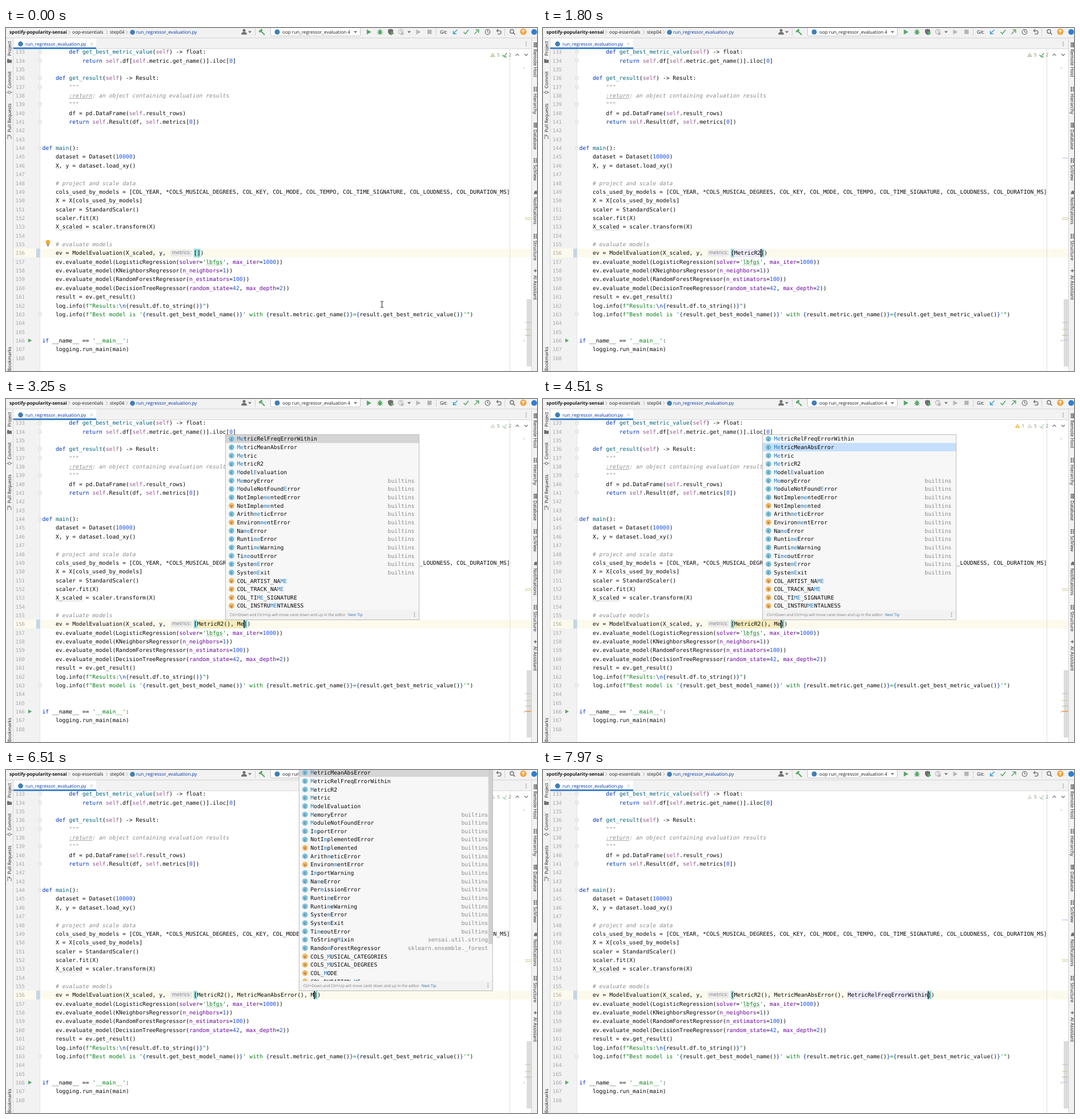
An HTML page that plays this animation: 930 by 602 pixels, repeating every 8 s.

```html
<!DOCTYPE html>
<html lang="en">
<head>
<meta charset="utf-8">
<title>Code completion</title>
<style>
html, body { margin: 0; width: 100%; height: 100%; overflow: hidden; background: #fff; }
svg { display: block; }
text { white-space: pre; text-rendering: geometricPrecision; }
.m { font: 9.725px "DejaVu Sans Mono", monospace; fill: #080808; }
.n { font-size: 9px; fill: #a8a8a8; }
.u { font: 8.1px "Open Sans", sans-serif; fill: #1a1a1a; }
.b { font-weight: 700; }
.k { fill: #0033b3; } .d { fill: #00627a; } .i { fill: #1750eb; }
.s { fill: #067d17; } .e { fill: #0037a6; } .p { fill: #94558d; }
.a { fill: #660099; } .c { fill: #8c8c8c; font-style: italic; }
.h { fill: #2480c4; }
</style>
</head>
<body>
<svg id="stage" width="930" height="602" viewBox="0 0 930 602"></svg>
<script>
const CW = 5.855, LINE = 15.357, ROW = 14.65, EDIT_X = 328.8, LOOP = 8000;
const lineY = n => 395 + (n - 156) * LINE;
const esc = s => s.replace(/&/g, '&amp;').replace(/</g, '&lt;').replace(/>/g, '&gt;');
const span = (cls, s) => `<tspan class="${cls}">${esc(s)}</tspan>`;
const rect = (x, y, w, h, fill, more = '') =>
  `<rect x="${x}" y="${y}" width="${w}" height="${h}" fill="${fill}" ${more}/>`;
const path = (d, stroke, w = 1, fill = 'none') =>
  `<path d="${d}" stroke="${stroke}" stroke-width="${w}" fill="${fill}"/>`;
const shape = (d, fill) => path(d, 'none', 0, fill);
const dot = (x, y, r, fill, more = '') => `<circle cx="${x}" cy="${y}" r="${r}" fill="${fill}" ${more}/>`;
const mono = (x, y, html, more = '') => `<text class="m" x="${x}" y="${y + 3.4}" ${more}>${html}</text>`;
const ui = (x, y, s, more = '') => `<text class="u" x="${x}" y="${y + 2.9}" ${more}>${s}</text>`;
const turned = (x, y, s, deg) =>
  `<text class="u" transform="translate(${x} ${y}) rotate(${deg})" y="2.9">${s}</text>`;
const down = (x, y) => shape(`M${x - 3} ${y - 1.5}h6l-3 3.5z`, '#6e6e6e');
const play = (x, y, fill, r = 4.5) => shape(`M${x - r * .8} ${y - r}l${r * 1.8} ${r}l${-r * 1.8} ${r}z`, fill);

const code = `        def get_best_metric_value(self) -> float:
            return self.df[self.metric.get_name()].iloc[0]

    def get_result(self) -> Result:
        """
        :return: an object containing evaluation results
        """
        df = pd.DataFrame(self.result_rows)
        return self.Result(df, self.metrics[0])


def main():
    dataset = Dataset(10000)
    X, y = dataset.load_xy()

    # project and scale data
    cols_used_by_models = [COL_YEAR, *COLS_MUSICAL_DEGREES, COL_KEY, COL_MODE, COL_TEMPO, COL_TIME_SIGNATURE, COL_LOUDNESS, COL_DURATION_MS]
    X = X[cols_used_by_models]
    scaler = StandardScaler()
    scaler.fit(X)
    X_scaled = scaler.transform(X)

    # evaluate models
    ev = ModelEvaluation(X_scaled, y,
    ev.evaluate_model(LogisticRegression(solver='lbfgs', max_iter=1000))
    ev.evaluate_model(KNeighborsRegressor(n_neighbors=1))
    ev.evaluate_model(RandomForestRegressor(n_estimators=100))
    ev.evaluate_model(DecisionTreeRegressor(random_state=42, max_depth=2))
    result = ev.get_result()
    log.info(f"Results:\\n{result.df.to_string()}")
    log.info(f"Best model is '{result.get_best_model_name()}' with {result.metric.get_name()}={result.get_best_metric_value()}'")


if __name__ == '__main__':
    logging.run_main(main)
`.split('\n');

function fstring(s) {
  return s.split(/(\{[^}]*\}|\\n)/).map(p =>
    p[0] === '{' ? span('e', '{') + esc(p.slice(1, -1)) + span('e', '}')
      : span(p === '\\n' ? 'e' : 's', p)).join('');
}
function paint(s) {
  if (/^"""|^:return/.test(s)) return span('c', s);
  const re = /(#.*)|(f"[^"]*")|('[^']*')|\bdef (\w+)|\b(def|return|if)\b|\b(self)\b|\b(\w+)(?==[\w'])|\b(\d+)\b/g;
  let out = '', at = 0;
  for (const m of s.matchAll(re)) {
    out += esc(s.slice(at, m.index));
    at = m.index + m[0].length;
    out += m[2] ? fstring(m[2])
      : m[4] ? span('k', 'def ') + span('d', m[4])
      : span(m[1] ? 'c' : m[3] ? 's' : m[5] ? 'k' : m[6] ? 'p' : m[7] ? 'a' : 'i', m[0]);
  }
  return out + esc(s.slice(at));
}
function wave(x, y, w, color) {
  let d = `M${x} ${y}`;
  for (let i = 0; i < w; i += 3) d += 'l1.5 -1.2l1.5 1.2';
  return path(d, color, .7);
}

function toolbar() {
  const green = '#59a869', gray = '#6e6e6e', pale = '#b8b8b8';
  let o = rect(0, 0, 930, 37, '#f2f2f2') + rect(0, 17, 930, 1, '#d4d4d4');
  o += ui(6, 7, span('b', 'spotify-popularity-sensai')) + ui(116, 7, 'oop-essentials') + ui(182, 7, 'step04');
  for (const x of [109, 175, 210]) o += path(`M${x} 4l3 3.3l-3 3.3`, '#9a9a9a', .8);
  o += dot(221.5, 7.5, 4.3, '#3f7fb5') + ui(228, 7, 'run_regressor_evaluation.py', 'style="fill:#0032a0"');
  o += dot(417, 4.2, 2.5, gray) + shape('M412 11.5q0 -4.5 5 -4.5t5 4.5z', gray) + down(427, 7);
  o += path('M436.5 1v13', '#d0d0d0') + path('M446 5l7 7', green, 2.2) + path('M443.5 7l5 -4.5', green, 3.4);
  o += rect(463.5, -3, 157, 17, '#fff', 'stroke="#c4c4c4" rx="2"') + dot(475, 7, 4.5, '#3f7fb5');
  o += ui(484, 7, 'oop run_regressor_evaluation 4') + down(612, 7);
  o += play(635.5, 7, green) + `<ellipse cx="655" cy="7.5" rx="2.8" ry="4" fill="${green}"/>`;
  o += path('M650.5 4l9 7M650.5 11l9 -7M650 7.5h10M653 2l2 2l2 -2', green);
  o += shape('M669 3l4.5 -1.5l4.5 1.5v4q-1 4 -4.5 5q-3.5 -1 -4.5 -5z', gray) + shape('M674 6l6 3.5l-6 3.5z', green);
  o += dot(691.5, 6.5, 4, 'none', `stroke="${pale}" stroke-width="1.3"`) + path('M691.5 4v3h2.5', pale);
  o += shape('M692 7l6 3l-6 3z', pale) + down(706, 7) + play(722, 7, pale) + rect(738, 3, 7.5, 7.5, '#b4b4b4');
  o += path('M753.5 1v13M873.5 1v13', '#d0d0d0') + ui(760, 7, 'Git:');
  o += path('M790.5 3l-7 7M783.5 5v5.2h5.2', '#389fd6', 1.5) + path('M801.5 7l3 3.3l5.5 -7', green, 1.7);
  o += path('M820.5 10.5l7 -7M822.5 3.3h5.3v5.3', green, 1.5);
  o += dot(843.5, 7, 4.3, 'none', `stroke="${gray}" stroke-width="1.2"`) + path('M843.5 4v3.3h2.5', gray);
  o += path('M862 2l-2.6 2.7l2.6 2.7M859.5 4.7h4.5a3 3 0 0 1 0 6h-3', gray, 1.3);
  o += dot(886, 6, 3.2, 'none', `stroke="${gray}" stroke-width="1.4"`) + path('M888.5 8.5l3 3', gray, 1.6);
  o += dot(906, 6.5, 5.5, '#f2a033') + path('M906 9.7v-6M903.4 6l2.6 -2.6l2.6 2.6', '#fff', 1.2) + dot(925, 7, 5, '#2f7fd0');
  // file tab
  o += rect(13, 18, 145, 19, '#fff') + rect(13, 34, 145, 3, '#4083c9') + rect(158, 36, 762, 1, '#d8d8d8');
  o += dot(25.5, 28, 4.4, '#3f7fb5') + ui(34, 28, 'run_regressor_evaluation.py', 'style="fill:#0032a0"');
  o += path('M147.5 25.5l4.5 4.5m0 -4.5l-4.5 4.5', '#b0b0b0', .8);
  for (const y of [25, 28, 31]) o += dot(911, y, .8, gray);
  return o;
}

function sidebars() {
  const gray = '#6e6e6e';
  let o = rect(0, 18, 13, 584, '#f2f2f2') + rect(12, 18, 1, 584, '#d4d4d4');
  o += rect(920, 18, 10, 584, '#f2f2f2') + rect(920, 18, 1, 584, '#d4d4d4');
  for (const [y, s] of [[49, 'Project'], [106, 'Commit'], [183, 'Pull Requests'], [602, 'Bookmarks']]) o += turned(6, y, s, -90);
  o += shape('M2 54.5h3l1 1.3h4v5.5h-8z', gray) + dot(6, 113, 2.2, 'none', `stroke="${gray}"`) + path('M1 113h2.8M8.2 113h2.8', gray);
  o += path('M3 187v8M9 195v-5q0 -1.5 -4 -1.5M6.5 186.5l-2 2l2 2', gray);
  const right = [[37, 'Remote Host'], [115, 'Hierarchy'], [178, 'Database'], [240, 'SciView'],
    [297, 'Notifications'], [373, 'Structure'], [434, 'AI Assistant']];
  right.forEach(([y, s], i) => {
    o += turned(926.5, y, s, 90);
    const t = y - 11.5;
    o += i === 4 ? shape(`M924 ${t + 6}q1 -1 1 -3t2.5 -3t2.5 3t1 3z`, gray)
      : i === 6 ? shape(`M927 ${t}l1 2.5l2.5 1l-2.5 1l-1 2.5l-1 -2.5l-2.5 -1l2.5 -1z`, gray)
      : [0, 3, 6].map(d => rect(924, t + d, i % 2 ? 3 : 6, 2, gray) + rect(928, t + d, 2, 2, gray)).join('');
  });
  return o;
}

function editor() {
  let o = rect(13, 37, 907, 565, '#fff') + rect(13, 37, 46, 565, '#f2f2f2') + rect(13, 387.2, 907, 15.6, '#fcfaed');
  o += rect(59, 37, 1, 565, '#e4e4e4') + rect(882, 37, 1, 565, '#dedede') + rect(53, 387.2, 6.5, 15.6, '#c3d6e8');
  code.forEach((s, i) => {
    const n = 133 + i, y = lineY(n), body = s.trimStart();
    o += `<text class="m n" x="33" y="${y + 3.4}" text-anchor="end">${n}</text>`;
    if (body) o += mono(63.5 + (s.length - body.length) * CW, y, paint(body));
  });
  for (const n of [133, 134, 136, 137, 139, 141, 144, 163]) {
    const y = lineY(n);
    o += rect(57, y - 2.5, 5, 5, '#fff', 'stroke="#cfcfcf" stroke-width=".8"') + path(`M58 ${y}h3`, '#b5b5b5', .7);
  }
  o += rect(110.5, lineY(138) + 4.8, 41, .8, '#8c8c8c');
  o += wave(87, lineY(146) + 6, 6, '#b4b4a8') + wave(87, lineY(153) + 6, 46, '#b4b4a8') + wave(350, lineY(157) + 6, 29, '#83b58a');
  o += play(41.8, lineY(166), '#59a869', 3.5);
  o += rect(288, 389, 38.5, 12, '#ededed', 'rx="3"') + ui(290.5, 394.2, 'metrics:', 'style="font-size:9px;fill:#7a7a7a"');
  // scrollbar and stripe
  o += rect(912, 476, 8, 118, '#dcdcdc') + rect(907, 68, 1, 4, '#c4c4c4') + rect(907, 547, 1, 4, '#b8c4b8');
  for (const [y, c] of [[333, '#d8cf9a'], [336, '#d8cf9a'], [517, '#c2c8bd'], [529, '#d3cba6'], [539, '#bcc5a0']]) o += rect(909, y - .5, 11, 1.2, c);
  o += path('M892.5 48.5l3 -3l3 3M908 45.5l3 3l3 -3', '#6e6e6e', 1.1);
  return o;
}

const metrics = { r: 'MetricRelFreqErrorWithin', a: 'MetricMeanAbsError', c: 'Metric', 2: 'MetricR2', e: 'ModelEvaluation' };
const rest = {
  m: 'MemoryError ModuleNotFoundError ImportError NotImplementedError NotImplemented ArithmeticError EnvironmentError ImportWarning NameError PermissionError RuntimeError RuntimeWarning SystemError SystemExit TimeoutError ToStringMixin RandomForestRegressor COLS_MUSICAL_CATEGORIES COLS_MUSICAL_DEGREES COL_MODE COL_DURATION_MS',
  me: 'MemoryError ModuleNotFoundError NotImplementedError NotImplemented ArithmeticError EnvironmentError NameError RuntimeError RuntimeWarning TimeoutError SystemError SystemExit COL_ARTIST_NAME COL_TRACK_NAME COL_TIME_SIGNATURE COL_INSTRUMENTALNESS',
  met: 'ArithmeticError', metr: ''
};
const origins = { ToStringMixin: 'sensai.util.string', RandomForestRegressor: 'sklearn.ensemble._forest' };
const originOf = s => origins[s] || (/^(?!Metric).*(Error|Warning)$|^System|^NotImpl/.test(s) ? 'builtins' : '');

function matched(s, q) {
  const i = s.toLowerCase().indexOf(q);
  if (i >= 0) return s.slice(0, i) + span('h', s.slice(i, i + q.length)) + s.slice(i + q.length);
  const j = s.indexOf('E');
  return span('h', s[0]) + s.slice(1, j) + span('h', 'E') + s.slice(j + 1);
}

// order: ranking of the first entries, n: visible rows
function popup({ q, order, n, sel = 0, active, bare }, x) {
  const base = 370.2, top = base - n * ROW, end = bare ? 387.5 : base;
  const names = [...order].map(k => metrics[k]).concat(rest[q].split(' ').filter(Boolean));
  let o = rect(x, top, 339, 387.5 - top, '#f7f7f7');
  o += `<clipPath id="list"><rect x="${x}" y="${top}" width="339" height="${end - top}"/></clipPath><g clip-path="url(#list)">`;
  o += rect(x, top + sel * ROW, 339, ROW, active ? '#c5dffc' : '#d5d5d5');
  names.forEach((s, i) => {
    const y = top + ROW * (i + .5) + .2, v = /^COL|^NotImplemented$|^EnvironmentError$/.test(s);
    if (y > end + 8) return;
    o += dot(x + 10.5, y, 4.9, v ? '#f3b65f' : '#7cc3de');
    o += `<text class="u" x="${x + 10.5}" y="${y + 2.5}" text-anchor="middle" style="font-size:7px;fill:#3b4045">${v ? 'v' : 'c'}</text>`;
    o += mono(x + 20, y, matched(s, q)) + mono(x + 331, y, originOf(s), 'text-anchor="end" style="fill:#8a8a8a"');
  });
  o += '</g>';
  if (q === 'm') {
    o += bare ? rect(x + 331.5, top, 7.5, 308, '#dedede') + rect(x + 331.5, top, 7.5, 15, '#c6c6c6')
      : rect(x + 331.5, top, 7.5, 308, '#d0d0d0');
  }
  if (!bare) {
    o += rect(x, base, 339, 17.3, '#f2f2f2');
    o += ui(x + 7.5, 378.3, 'Ctrl+Down and Ctrl+Up will move caret down and up in the editor<tspan dx="4" style="fill:#2470b3">Next Tip</tspan>',
      'style="font-size:6.7px;fill:#787878"');
    for (const y of [375.3, 378.3, 381.3]) o += dot(x + 331, y, .8, '#6e6e6e');
  }
  return o + rect(x, top, 339, 387.5 - top, 'none', 'stroke="#b4b4b4" stroke-width=".9"');
}

const list = (q, order, n, more) => ({ pop: { q, order, n, ...more } });
const R2 = 'MetricR2', A = R2 + '(), ', MAE = A + 'MetricMeanAbsError', B = MAE + '(), ';
// s: typed text, pair: 1 outer brackets, 2 call parentheses, use: highlighted word length
const steps = [
  [0, { s: '', pair: 1, caret: 0, bulb: 1, mouse: 1, bright: 1, pop: 0, use: 0, mark: 0, warn: 0, alert: 0, one: 0 }],
  [320, { bulb: 0 }],
  [450, { caret: 1 }],
  [780, { s: 'M', mouse: 0 }],
  [850, list('m', '2cera', 25.45)],
  [990, list('m', '2cera', 21, { bare: 1 })],
  [1050, { s: 'Me', ...list('me', '2cera', 21) }],
  [1190, { s: 'Met' }],
  [1260, list('met', '2cra', 5)],
  [1320, { s: 'Metr', ...list('metr', '2cra', 4) }],
  [1800, { s: R2, pop: 0, use: 8, mark: 228 }],
  [2060, { s: R2 + '(', pair: 0, bright: 0 }],
  [2130, { s: R2 + '()', pair: 2 }],
  [2390, { use: 0, mark: 0 }],
  [2460, { warn: 1, alert: 1 }],
  [2790, { s: R2 + '(),', pair: 1 }],
  [2850, { s: A }],
  [3050, { s: A + 'M' }],
  [3120, list('m', 'rac2e', 25.45)],
  [3180, list('m', 'rac2e', 21, { bare: 1 })],
  [3250, { s: A + 'Me', ...list('me', 'rac2e', 21) }],
  [3980, { caret: 0 }],
  [4110, { one: 1 }],
  [4460, { caret: 1 }],
  [4510, list('me', 'rac2e', 21, { sel: 1, active: 1 })],
  [4860, { s: MAE, pop: 0, use: 18, mark: 193, alert: 0 }],
  [5190, { warn: 0 }],
  [5520, { s: MAE + '(', pair: 0, use: 0, mark: 0 }],
  [5660, { s: MAE + '()' }],
  [5720, { pair: 2 }],
  [6180, { s: B, pair: 1 }],
  [6450, { s: B + 'M' }],
  [6510, list('m', 'ar2ce', 25.45)],
  [6580, list('m', 'ar2ce', 21, { bare: 1 })],
  [6650, { s: B + 'Me', ...list('me', 'ar2ce', 21) }],
  [6710, { s: B + 'Met', ...list('met', 'ra2c', 5) }],
  [6840, { s: B + 'Metr', ...list('metr', 'ra2c', 4) }],
  [7570, { caret: 0 }],
  [7700, { one: 0 }],
  [7970, { s: B + metrics.r, pop: 0, caret: 1, use: 24, mark: 263 }]
];
const states = [];
for (const [, change] of steps) states.push({ ...states[states.length - 1], ...change });

function warning(x, num, color) {
  return path(`M${x} 50.5l4 -7l4 7z`, color, .8, color) + path(`M${x + 4} 45.5v2.6m0 .8v.9`, '#fff', .9) +
    ui(x + 11.5, 47, num, 'style="fill:#7d7d7d"');
}

function draw(st) {
  const { s } = st, at = i => EDIT_X + i * CW, end = s.length + 1;
  const cell = (i, n, c) => rect(at(i), 387.5, n * CW, 15, c);
  let o = '';
  if (st.warn) o += cell(1, s.length, '#f6ebbc');
  if (st.use) o += cell(end - st.use, st.use, '#edebfc');
  if (st.pair === 1) o += cell(0, 1, '#93d9d9') + cell(end, 1, '#93d9d9');
  if (st.pair === 2) o += cell(end - 2, 2, '#93d9d9');
  o += mono(EDIT_X, 395, '[' + s + '])');
  if (st.caret) o += rect(at(end) - .4, 388, 1.4, 14, '#000');
  if (st.bulb) o += dot(73.5, 376, 3.9, '#f0a732') + rect(71.8, 380, 3.4, 2.6, '#7f7f7f');
  const check = st.bright ? '#59a869' : '#b5d6bc';
  if (st.one) o += warning(827, '1', '#f2c55c');
  o += warning(848.5, '5', st.bright ? '#cfc6ae' : '#dfdcd2');
  o += path('M869.5 47l2.7 3l5 -6M872.5 50.8h4.5', check, 1.5) + ui(880.5, 47, '2', 'style="fill:#7d7d7d"');
  if (st.mark) o += [st.mark, 548].map(y => rect(909, y - .5, 11, 1.3, '#c9c6ee')).join('');
  if (st.alert) o += rect(909, 547.5, 11, 1.6, '#eb9a3c');
  if (st.mouse) o += path('M656 479.5q2.5 0 2.5 1.5v8q0 1.5 -2.5 1.5M661 479.5q-2.5 0 -2.5 1.5M661 490.5q-2.5 0 -2.5 -1.5', '#222', 1);
  if (st.pop) o += popup(st.pop, at(s.lastIndexOf(' ') + 2) - 20.5);
  return o;
}

const stage = document.getElementById('stage');
stage.innerHTML = editor() + toolbar() + sidebars() + '<g id="live"></g>';
const live = document.getElementById('live');
const start = performance.now();
let shown = -1;
function tick() {
  const t = (performance.now() - start) % LOOP;
  const i = steps.findLastIndex(([from]) => from <= t);
  if (i !== shown) live.innerHTML = draw(states[shown = i]);
  requestAnimationFrame(tick);
}
tick();
</script>
</body>
</html>
```
